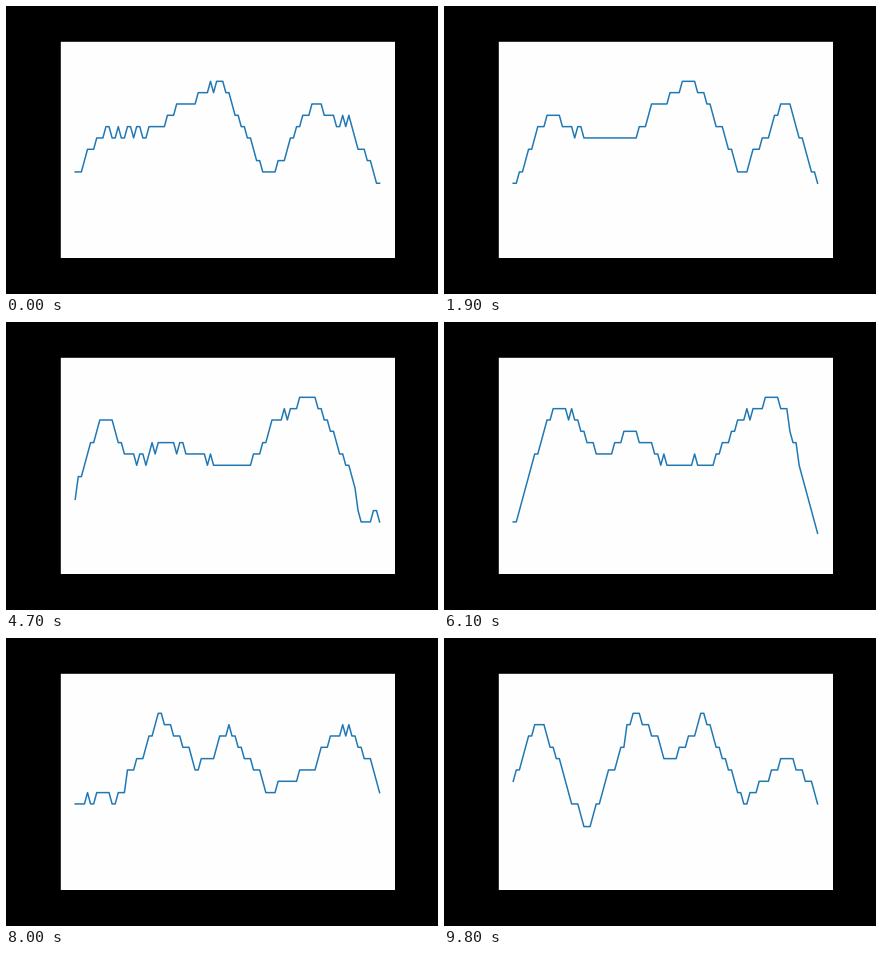
A matplotlib script for the animation above (9.9 s loop, 432 by 288 pixels).

```python
import numpy as np
import matplotlib.pyplot as plt
from matplotlib.animation import FuncAnimation

WIDTH, HEIGHT, DPI = 432, 288, 72
FRAMES, INTERVAL = 99, 100
COUNT = 100
STEPS = 16          # the height scale 0..1 is cut into this many steps
DRIFT = 0.63        # samples the terrain moves right per frame
SHORE, DROP = 10, 6  # width and depth of the slope at both edges

# Hills and dips: place on the terrain, then height at start, middle and end.
MOMENTS = (0, 49, 98)
FEATURES = np.array([
    (-54, 12, 12, 13.4),
    (-38, 9, 9, 2.5),
    (-22, 9, 12.2, 13.2),
    (-10, 11, 7.2, 8.6),
    (0, 10.5, 9, 13),
    (13, 8.5, 7.5, 5.3),
    (27, 8.7, 6.7, 9),
    (34, 10.8, 10.4, 11.2),
    (47, 13, 13.5, 12.3),
    (63, 4.4, 4.6, 8),
    (77, 11, 13, 13),
    (86, 9.3, 11, 11),
    (99, 10, 10, 10),
])

xs = np.arange(COUNT)
shore = DROP * np.clip(1 - np.minimum(xs, xs[::-1]) / SHORE, 0, 1)


def roughness(place, t):
    return (0.25 * np.sin(1.9 * place + 0.1 * t)
            + 0.2 * np.sin(0.8 * place - 0.05 * t))


def heights(t):
    place = xs - DRIFT * t
    levels = [np.interp(t, MOMENTS, keys) for keys in FEATURES[:, 1:]]
    relief = np.interp(place, FEATURES[:, 0], levels)
    h = np.floor(relief + roughness(place, t) - shore + 0.5)
    return (np.clip(h, 0, 14) + 1) / STEPS


fig, ax = plt.subplots(figsize=(WIDTH / DPI, HEIGHT / DPI), dpi=DPI,
                       facecolor="black")
fig.subplots_adjust(left=0.125, right=0.9, bottom=0.125, top=0.88)
ax.set(xlim=(-4.95, 103.95), ylim=(-0.1, 1.1), xticks=[], yticks=[],
       facecolor="#fefefe")
line, = ax.plot(xs, heights(0), color="#1f77b4", lw=1.5)


def update(frame):
    line.set_ydata(heights(frame))
    return line,


anim = FuncAnimation(fig, update, frames=FRAMES, interval=INTERVAL,
                     repeat=True, repeat_delay=0)
plt.show()
```
